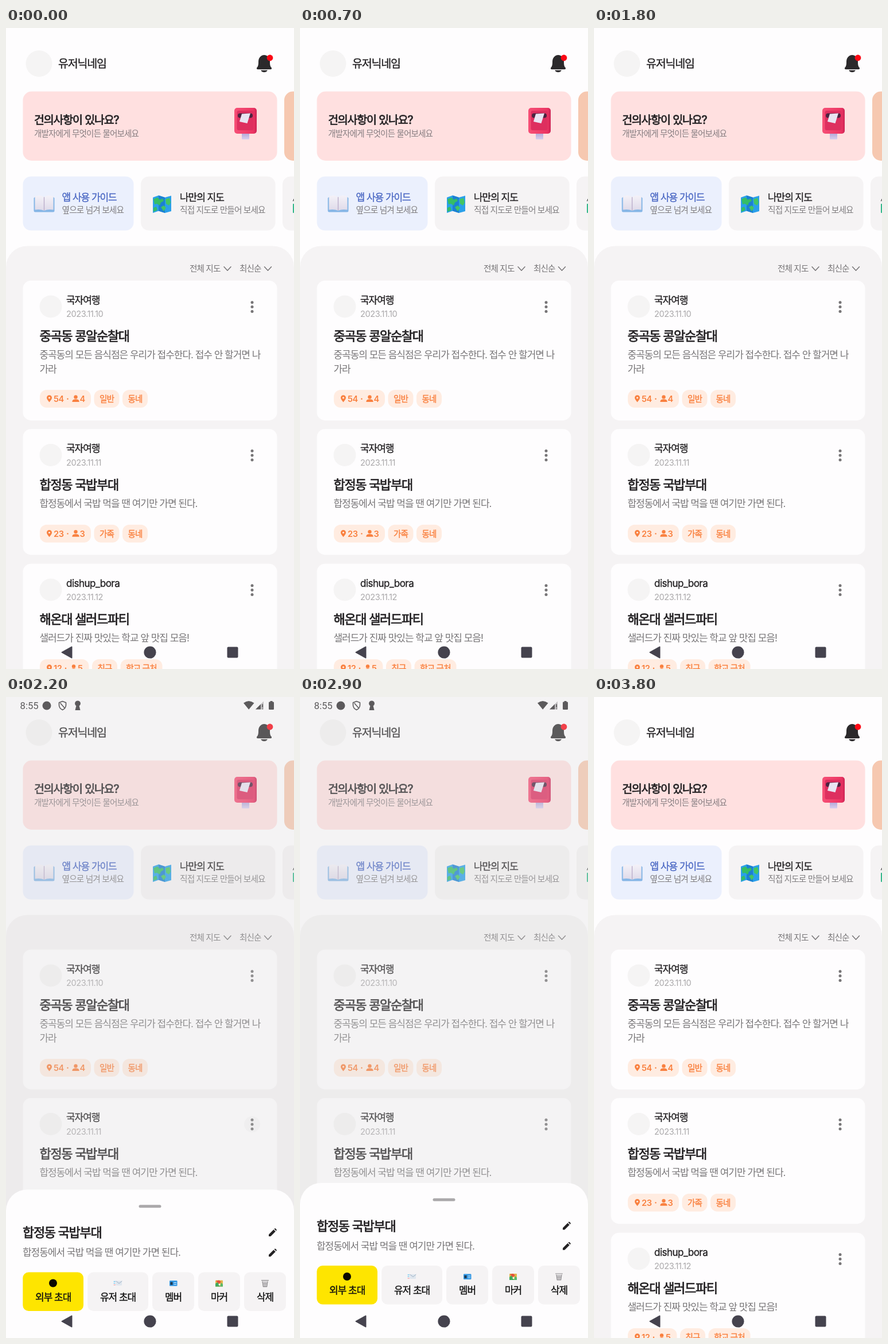
Write an HTML page that moves like this. It is 502x1116 px and loops after 3.9 s.

```html
<!DOCTYPE html>
<html lang="ko">
<head>
<meta charset="utf-8">
<title>지도 목록</title>
<style>
  html, body { margin: 0; width: 100%; height: 100%; overflow: hidden; background: #fefdfe; }
  svg { display: block; width: 100vw; height: 100vh; }
  text { font-family: Inter, "Noto Sans CJK KR", "Noto Sans CJK", sans-serif; letter-spacing: -.06em; white-space: pre; }
  .medium { stroke-width: .35px; }
  .bold { stroke-width: .75px; }
  .strong { font-weight: 600; }
  .latin { letter-spacing: -.03em; }
  .clock { font-family: Roboto, sans-serif; letter-spacing: 0; }
  .mid { text-anchor: middle; }
</style>
</head>
<body>
<svg id="stage" viewBox="0 0 502 1116">
  <defs>
    <linearGradient id="post" x2="1"><stop stop-color="#f64f76"/><stop offset=".85" stop-color="#ec3563"/><stop offset="1" stop-color="#cc2455"/></linearGradient>
    <linearGradient id="pole" x2="0" y2="1"><stop stop-color="#a99bd0"/><stop offset="1" stop-color="#d9cfee"/></linearGradient>
    <linearGradient id="page" x2="0" y2="1"><stop stop-color="#f4f2f8"/><stop offset="1" stop-color="#dfdae9"/></linearGradient>
  </defs>
  <g id="home"></g>
  <rect id="scrim" width="502" height="1116" fill="#d6d6d6"/>
  <g id="status"></g>
  <g id="sheet"></g>
  <g fill="#45434e" stroke="#45434e" stroke-width="2" stroke-linejoin="round">
    <path d="M97.500 1087L114.500 1077.500V1096.500Z"/>
    <circle cx="251" cy="1087" r="9.6"/>
    <rect x="386.500" y="1078.500" width="17" height="17" rx="1"/>
  </g>
</svg>
<script>
const $ = id => document.getElementById(id);
const INK = '#242224', GREY = '#777577', PALE = '#f5f3f4', WHITE = '#fefdfe', ORANGE = '#f9803f';

const text = (x, y, size, str, fill = INK, cls = '') =>
  `<text x="${x}" y="${y}" font-size="${size}" fill="${fill}"` +
  ` class="${cls}${/[가-힣]/.test(str) ? '' : ' latin'}"` +
  `${/medium|bold/.test(cls) ? ` stroke="${fill}"` : ''}>${str}</text>`;
const box = (x, y, w, h, r, fill) =>
  `<rect x="${x}" y="${y}" width="${w}" height="${h}" rx="${r}" fill="${fill}"/>`;
const dot = (x, y, r, fill) => `<circle cx="${x}" cy="${y}" r="${r}" fill="${fill}"/>`;
const path = (d, fill = 'none', stroke = 'none', width = 1) =>
  `<path d="${d}" fill="${fill}" stroke="${stroke}" stroke-width="${width}" stroke-linecap="round" stroke-linejoin="round"/>`;
const at = (x, y, body) => `<g transform="translate(${x} ${y})">${body}</g>`;

const bell = at(450, 62,
  path('M-13 7.500C-10 4.500-10 1-10-4C-9.500-11-5-15 0-15S9.500-11 10-4C10 1 10 4.500 13 7.500Q13.500 10 11 10H-11Q-13.500 10-13 7.500Z', '#2b292b') +
  path('M-6 11.500H6Q4 15 0 15T-6 11.500Z', '#2b292b') + dot(10, -10, 5.4, '#fb0714'));

const postbox = box(411, 180, 13, 14, 1, 'url(#pole)') + box(398, 139, 39, 45, 5, 'url(#post)') +
  box(402.5, 144, 29, 34, 3, '#de2f5f') + box(404, 148.5, 26, 8, 4, '#4b2340') +
  path('M411 149.500L426 148.500L420.500 166L407 163Z', '#e9e4f2');

const book = path('M48.500 318V296L51 294H82L84.500 296V318Q84.500 320.500 82 320.500H51Q48.500 320.500 48.500 318Z', '#86b6e6') +
  path('M50.500 316.500V293Q60 289.500 66.500 294V318Q60 315 50.500 316.500Z', 'url(#page)') +
  path('M82.500 316.500V293Q73 289.500 66.500 294V318Q73 315 82.500 316.500Z', 'url(#page)') +
  path('M66.500 295V317', 'none', '#b8abc9', 1.3);

const map = path('M256 295L266 291.500L277 295L288 292V319L277 322L266 318.500L256 322Z', '#2aa0ea') +
  path('M266 291.500L277 295V322L266 318.500Z', '#1c80d2') +
  path('M257 298L264 295L268 299L273 297L275 301L270 304L268 309L263 306L259 307Z', '#35bd65') +
  path('M278 298L285 296L287 304L284 309L279 306ZM270 312L275 309L279 313L275 319Z', '#43c563') +
  path('M257 313L262 311L264 317L257 320Z', '#35bd65');

const chevron = x => path(`M${x - 6} 415.800L${x} 422.200L${x + 6} 415.800`, 'none', GREY, 1.5);
const pin = path('M75.500 651.500C73 648 71 646.500 71 643.800A4.500 4.500 0 0 1 80 643.800C80 646.500 78 648 75.500 651.500Z', ORANGE) +
  dot(75.5, 643.8, 1.6, '#ffece1');
const person = x => dot(x, 642.4, 3.2, ORANGE) +
  path(`M${x - 6} 651V649.500Q${x - 5} 646.300 ${x} 646.300T${x + 6} 649.500V651Z`, ORANGE);

function chips(places, members, width, tags) {
  const end = 59 + width;
  let x = end + 5.5;
  return box(59, 630, width, 31, 12, '#ffece1') + pin +
    text(83, 651, 14.6, places, ORANGE, 'strong') + dot(end - 40.5, 645.7, 1.2, ORANGE) +
    person(end - 26.5) + text(end - 19.5, 651, 14.6, members, ORANGE, 'strong') +
    tags.map(([label, w]) => {
      const chip = box(x, 630, w, 31, 12, '#ffece1') + text(x + w / 2, 651, 14.6, label, ORANGE, 'medium mid');
      x += w + 5.5;
      return chip;
    }).join('');
}

function card(dy, height, user, date, title, lines, chipShift, chipRow) {
  return at(0, dy, box(29.5, 439.7, 443, height, 14, WHITE) + dot(78, 485, 19.5, '#f5f4f4') +
    text(105, 479.5, 17, user, INK, 'medium') + text(105, 503, 14.6, date, '#aaa8aa') +
    [477.8, 485.6, 493.4].map(y => dot(429, y, 2.5, GREY)).join('') +
    text(58.5, 544, 22, title, INK, 'bold') +
    lines.map((line, i) => text(58.5, 575.3 + i * 24.3, 17, line, GREY)).join('') +
    at(0, chipShift, chipRow));
}

$('home').innerHTML =
  box(0, 0, 502, 1116, 0, WHITE) +
  dot(57.5, 62, 23, '#f5f4f4') + text(91, 69, 19.5, '유저닉네임', INK, 'medium') + bell +
  box(29.5, 110.5, 443, 120.5, 15, '#ffe0e0') + box(485, 110.5, 60, 120.5, 15, '#f6c8b0') +
  text(49, 167, 19.5, '건의사항이 있나요?', INK, 'bold') +
  text(49, 189.3, 14.6, '개발자에게 무엇이든 물어보세요', '#857d80') + postbox +
  box(29.5, 258.5, 193, 94, 14, '#ebf0fd') + box(235, 258.5, 234.5, 94, 14, PALE) + box(482, 258.5, 60, 94, 14, PALE) +
  book + text(97.5, 301.3, 17, '앱 사용 가이드', '#4c69c4', 'medium') + text(97.5, 322.4, 14.7, '옆으로 넘겨 보세요', '#807e80') +
  map + text(303, 301.3, 17, '나만의 지도', INK, 'medium') + text(303, 322.4, 14.7, '직접 지도로 만들어 보세요', '#807e80') +
  path('M500.500 301L502 298', 'none', '#444', 1.2) + box(500, 306, 4, 16, 1, '#35b98c') +
  box(0, 379.5, 502, 800, 37, PALE) +
  text(320, 424.3, 14.6, '전체 지도', GREY) + chevron(386) + text(407, 424.3, 14.6, '최신순', GREY) + chevron(456.5) +
  card(0, 243.5, '국자여행', '2023.11.10', '중곡동 콩알순찰대',
    ['중곡동의 모든 음식점은 우리가 접수한다. 접수 안 할거면 나', '가라'], 0,
    chips('54', '4', 89, [['일반', 44], ['동네', 44]])) +
  card(258.5, 219, '국자여행', '2023.11.11', '합정동 국밥부대',
    ['합정동에서 국밥 먹을 땐 여기만 가면 된다.'], -23.8,
    chips('23', '3', 89, [['가족', 44], ['동네', 44]])) +
  card(493, 219, 'dishup_bora', '2023.11.12', '해온대 샐러드파티',
    ['샐러드가 진짜 맛있는 학교 앞 맛집 모음!'], -24,
    chips('12', '5', 85.5, [['친구', 44], ['학교 근처', 73]])) +
  '<circle id="ripple" cx="429" cy="744" r="14"/>';

const TINT = '#5c5a5c';
$('status').innerHTML =
  text(24.5, 20.8, 16.7, '8:55', TINT, 'clock') + dot(71, 15, 7.5, TINT) +
  path('M98.500 7.500L104.500 9.700V14.500Q104 20 98.500 22.500Q93 20 92.500 14.500V9.700Z', 'none', TINT, 1.6) +
  path('M95 11L102 19', 'none', TINT, 1.5) +
  dot(125, 11.3, 4.9, TINT) + path('M123 13H127L129.500 23H120.500Z', TINT) +
  path('M414 10.500Q423 3.500 432.500 10.500L423.200 21.800Z', TINT) +
  path('M435 21.500L449 7.500V21.500Z', '#c4c2c4') + path('M435 21.500L444 12.500V21.500Z', TINT) +
  path('M447 13V17.500M447 20.500V20.600', 'none', TINT, 1.7) +
  box(458, 8.5, 9, 13.5, 1.3, TINT) + box(460.5, 7, 4, 3, 0, TINT);

const pencil = y => at(464.5, y,
  path('M-6.500 6.500V3.200L2-5.300L5.300-2L-3.200 6.500Z', INK) + path('M3-6.300L4-7.200Q4.700-7.700 5.400-7L7-5.400Q7.700-4.700 7.200-4L6.300-3Z', INK));

const envelope = box(191.5, 159, 10.5, 8, 1, '#dfe6ee') + path('M192 159.500L197 163.500L202 159.500', 'none', '#9eb0c4', 1) +
  path('M188 160H190.500M188 163H190', 'none', '#48b8ed', 1) + path('M188 166H190.500', 'none', '#ed8c92', 1);
const idCard = box(285, 158.5, 13.5, 9.5, 1.2, '#3598e3') + box(286.5, 161, 4, 5, .5, '#1c3953') +
  path('M293 162H296.500M293 165H296.500', 'none', '#d8efff', 1.1);
const marker = box(365, 158, 13, 11, 1, '#e6b54d') + path('M365 169V164L369 161L373 169Z', '#40a95d') +
  path('M373 169L375 162L378 165V169Z', '#57b96b') + path('M366 159L371.500 158L375 161L371 164Z', '#e4503d') + dot(372, 165.5, 1.5, '#fff');
const bin = path('M445.500 158H457.500M447 160L448.300 169H454.700L456 160', '#d5d3d5', '#8b898b', 1.2) +
  path('M450 160.500L450.500 168.500M453 160.500L452.500 168.500M447.500 164H455.500', 'none', '#9c9a9c', .8);

const button = (x, w, fill, label, icon) =>
  box(x, 144, w, 67.5, 10, fill) + icon + text(x + w / 2, 193.3, 17, label, '#111', 'medium mid');

$('sheet').innerHTML =
  box(0, 0, 502, 400, 37, WHITE) + box(231.5, 26.8, 39, 5, 2.5, '#aba9ab') +
  text(29, 82.8, 22, '합정동 국밥부대', INK, 'bold') + pencil(75) +
  text(29, 115.6, 17, '합정동에서 국밥 먹을 땐 여기만 가면 된다.', GREY) + pencil(110.3) +
  button(29.3, 105.7, '#fee500', '외부 초대', dot(82, 163, 7, '#0a0800')) +
  button(142.2, 105.8, PALE, '유저 초대', envelope) +
  button(255, 73, PALE, '멤버', idCard) +
  button(335, 73, PALE, '마커', marker) +
  button(415, 73, PALE, '삭제', bin);

const LOOP = 3900, OPEN = 2000, CLOSE = 2905, SLIDE = 270;
const clamp = v => Math.min(1, Math.max(0, v));

// cubic-bezier(.4, 0, .2, 1), solved by bisection
function ease(x) {
  let lo = 0, hi = 1;
  for (let i = 0; i < 20; i++) {
    const u = (lo + hi) / 2;
    const bx = 1.2 * u * (1 - u) ** 2 + .6 * u * u * (1 - u) + u ** 3;
    if (bx < x) lo = u; else hi = u;
  }
  return lo * lo * (3 - 2 * lo);
}

function draw() {
  const t = performance.now() % LOOP;
  const shown = ease(clamp((t - OPEN) / SLIDE)) - ease(clamp((t - CLOSE) / SLIDE));
  $('sheet').setAttribute('transform', `translate(0 ${1116 - 270 * shown})`);
  $('scrim').setAttribute('opacity', .28 * shown);
  $('status').setAttribute('opacity', t >= OPEN && t < CLOSE + SLIDE ? 1 : 0);
  $('ripple').setAttribute('opacity', .03 * clamp((t - 1900) / 80) * clamp((2350 - t) / 200));
  requestAnimationFrame(draw);
}
draw();
</script>
</body>
</html>
```
